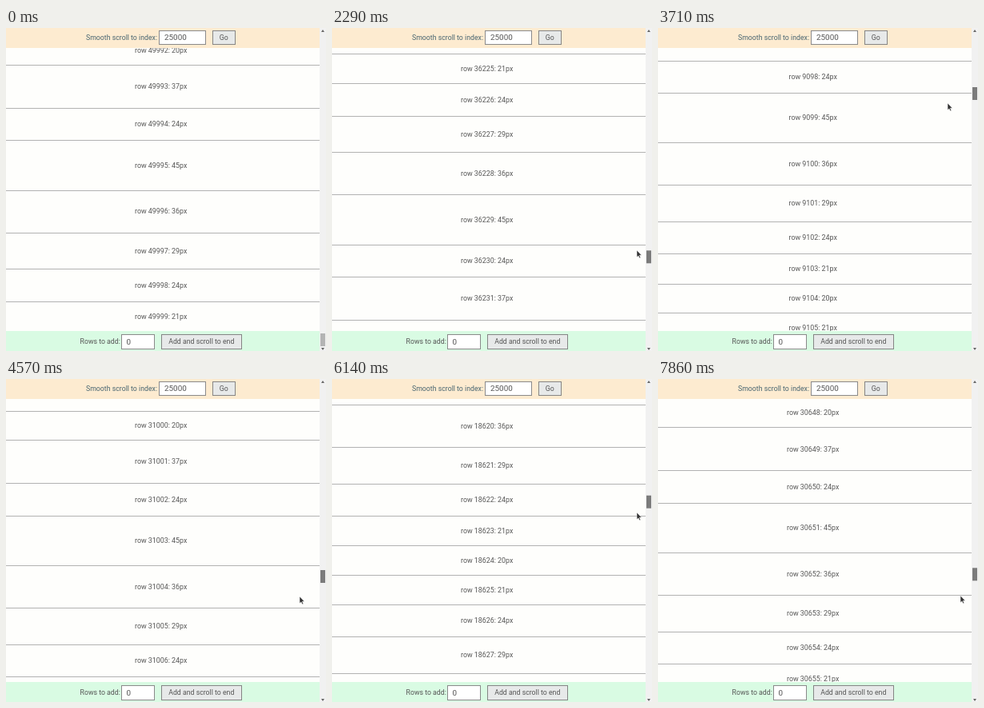
Write an HTML page that moves like this. It is 400x404 px and loops after 8 s.

```html
<!DOCTYPE html>
<html lang="en">
<head>
<meta charset="utf-8">
<title>Virtual list</title>
<style>
  html, body { margin: 0; height: 100%; overflow: hidden; background: #fefefc; }
  svg { display: block; width: 100vw; height: 100vh; font: 8.75px Roboto, sans-serif; fill: #555; }
  #rows { font-size: 8.9px; text-anchor: middle; }
  #rows path { stroke: #b2b2b2; }
  .head { fill: #486570; }
  .field { fill: #fff; stroke: #8a8a8a; }
  .button { fill: #e7e9e9; stroke: #858585; }
  .value { font-size: 9.9px; }
  .mid { text-anchor: middle; }
</style>
</head>
<body>
<svg viewBox="0 0 400 404">
  <rect width="400" height="404" fill="#fefefc"/>
  <g id="rows"></g>

  <rect width="392" height="25" fill="#fdebd0"/>
  <text class="head" x="100" y="15">Smooth scroll to index:</text>
  <rect class="field" x="191.5" y="3.5" width="58" height="17"/>
  <text class="value" x="198" y="15.3">25000</text>
  <rect class="button" x="258.5" y="3.5" width="28" height="17"/>
  <text class="mid" x="272.3" y="15">Go</text>

  <rect y="379" width="392" height="25" fill="#d9fbe3"/>
  <text x="92.5" y="395">Rows to add:</text>
  <rect class="field" x="144.5" y="383.5" width="41" height="18"/>
  <text class="value" x="150.5" y="395.8">0</text>
  <rect class="button" x="194.5" y="383.5" width="100" height="18"/>
  <text class="mid" x="244.3" y="395">Add and scroll to end</text>

  <rect x="392" width="8" height="404" fill="#f1f1f1"/>
  <path d="M394 5l2-3 2 3zM394 400l2 3 2-3z" fill="#666"/>
  <rect id="thumb" x="393" width="6" height="16"/>
  <path id="cursor" d="M0 0V8.6L2 6.9 3.3 9.8 4.7 9.2 3.4 6.3H6Z" fill="#333" stroke="#fff" stroke-width=".5"/>
</svg>
<script>
const DURATION = 8000, STEPS = 56;
const PERIOD = 16, ROW_COUNT = 50000;
const TOP = 25, BOTTOM = 379;

// Row sizes repeat every 16 rows.
const rowSize = i => 20 + (i * i) % 32;
const rowHeight = i => 1.04 * (rowSize(i) + 14.9);
const offsets = [0];
for (let i = 0; i < PERIOD; i++) offsets.push(offsets[i] + rowHeight(i));
const cycle = offsets[PERIOD];
const rowTop = i => Math.floor(i / PERIOD) * cycle + offsets[i % PERIOD];

// step, row, its y on the stage, pointer x, pointer y
const keys = [
  [0, 49993, 46.5, 386, 398],
  [4, 49993, 46.5, 391, 386],
  [9, 46522, 81.5, 390, 359],
  [16, 36225, 32.5, 381, 278],
  [23, 5000, 40, 366, 56],
  [26, 9098, 41, 362, 94],
  [32, 31000, 40.5, 367, 272],
  [35, 37500, 40, 371, 308],
  [40, 14000, 40, 379, 126],
  [43, 18620, 32.5, 381, 167],
  [47, 33000, 40, 377, 272],
  [51, 18500, 40, 377, 160],
  [55, 30648, 24.6, 378, 271]
].map(([step, row, y, px, py]) => [step, rowTop(row) - y, px, py]);
const maxScroll = keys[0][1];

// Smooth curve through the keys.
function sample(step, column) {
  let k = 0;
  while (k < keys.length - 2 && step >= keys[k + 1][0]) k++;
  const slope = j => {
    const a = keys[Math.max(j - 1, 0)], b = keys[Math.min(j + 1, keys.length - 1)];
    return (b[column] - a[column]) / (b[0] - a[0]);
  };
  const a = keys[k], b = keys[k + 1], span = b[0] - a[0];
  const u = (step - a[0]) / span, v = 1 - u;
  return a[column] * (1 + 2 * u) * v * v + b[column] * u * u * (3 - 2 * u)
    + span * u * v * (slope(k) * v - slope(k + 1) * u);
}

const rows = document.getElementById("rows");
const thumb = document.getElementById("thumb");
const cursor = document.getElementById("cursor");

function drawRows(scroll) {
  let i = Math.floor(scroll / cycle) * PERIOD;
  while (rowTop(i + 1) - scroll < TOP - 4) i++;
  let markup = "";
  for (; i < ROW_COUNT && rowTop(i) - scroll < BOTTOM; i++) {
    const y = rowTop(i) - scroll, bottom = y + rowHeight(i);
    markup += `<text x="193.7" y="${Math.round(y + rowHeight(i) / 2 + 2.7)}">row ${i}: ${rowSize(i)}px</text>`
      + `<path d="M0 ${Math.floor(y) + .5}H392M0 ${Math.floor(bottom) + .5}H392"/>`;
  }
  rows.innerHTML = markup;
}

let shown = -1;
function frame(now) {
  const step = Math.floor((now % DURATION + 6) * STEPS / DURATION) % STEPS;
  if (step !== shown) {
    shown = step;
    const scroll = Math.min(sample(step, 1), maxScroll);
    drawRows(scroll);
    thumb.setAttribute("y", (5.5 + scroll / cycle * PERIOD * 308 / 40895).toFixed(1));
    thumb.setAttribute("fill", step < 3 ? "#b4b4b4" : "#7b7b7b");
    cursor.setAttribute("visibility", step ? "visible" : "hidden");
    cursor.setAttribute("transform", `translate(${sample(step, 2)} ${sample(step, 3)})`);
  }
  requestAnimationFrame(frame);
}
const start = performance.now();
const tick = () => frame(Math.max(0, performance.now() - start));
frame = (draw => () => draw(Math.max(0, performance.now() - start)))(frame);
tick();
</script>
</body>
</html>
```
